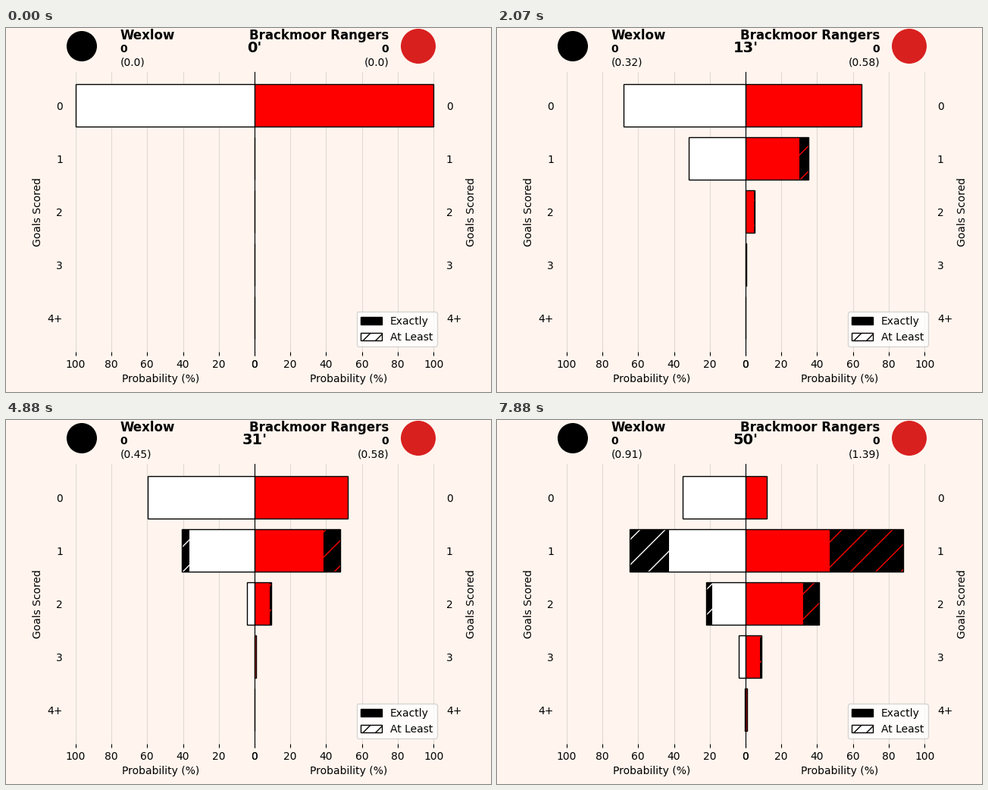
These frames come from a looping animation (640x480 px, 8 s). A matplotlib script:

```python
import numpy as np
import matplotlib.pyplot as plt
from matplotlib.animation import FuncAnimation
from matplotlib.patches import Circle, Patch

STEP = 20                    # ms per drawn frame
LOOP = 8000
HOLD, SUB, SUBS = 160, 30, 5  # quiet minute, and the pieces of a minute with a shot
PAPER = "seashell"
ROWS = np.arange(5)

# minute -> chance of scoring
HOME = {10: .318, 16: .02, 19: .10, 24: .01, 40: .251, 45: .21}
AWAY = {2: .14, 3: .131, 9: .02, 13: .288, 37: .76, 47: .05}

busy = set(HOME) | set(AWAY)
lengths = [SUB * SUBS if m in busy else HOLD for m in range(51)]
starts = np.concatenate([[0], np.cumsum(lengths)[:-1]])


def goal_odds(shots, minute, share):
    """Percent chance of exactly and of at least 0..4 goals."""
    dist = np.array([1.0])
    for m, p in shots.items():
        if m <= minute:
            p *= share if m == minute else 1
            dist = np.convolve(dist, [1 - p, p])
    dist = np.pad(dist, (0, 5))
    tail = dist[::-1].cumsum()[::-1][:5]
    exact = dist[:5].copy()
    exact[4] = tail[4]
    tail[0] = exact[0]
    return 100 * exact, 100 * tail


class Side:
    def __init__(self, ax, name, color, shots, align):
        self.shots = shots
        zero = np.zeros(5)
        self.tail = ax.barh(ROWS, zero, color="black", edgecolor=color,
                            hatch="/", linewidth=0)
        self.exact = ax.barh(ROWS, zero, color=color, linewidth=0)
        self.frame = ax.barh(ROWS, zero, fill=False, edgecolor="black", linewidth=1)
        ax.text(75, -1.25, name, ha=align, weight="bold", size=12)
        ax.text(75, -1, "0", ha=align, weight="bold")
        self.total = ax.text(75, -.75, "", ha=align)

    def update(self, minute, share):
        exact, tail = goal_odds(self.shots, minute, share)
        for bars, widths in ((self.tail, tail), (self.exact, exact), (self.frame, tail)):
            for bar, w in zip(bars, widths):
                bar.set_width(w)
        total = sum(p for m, p in self.shots.items() if m <= minute)
        self.total.set_text(f"({round(float(total), 2)})")


def style(ax, xlim, inner):
    ax.set(xlim=xlim, ylim=(4.64, -.64), xticks=range(0, 101, 20),
           xlabel="Probability (%)", ylabel="Goals Scored", facecolor=PAPER)
    ax.set_yticks(ROWS, ["0", "1", "2", "3", "4+"])
    ax.tick_params(axis="y", length=0)
    ax.set_axisbelow(True)
    ax.grid(axis="x", alpha=.4)
    for side, spine in ax.spines.items():
        spine.set_visible(side == inner)


fig, (left, right) = plt.subplots(1, 2, figsize=(6.4, 4.8), dpi=100, facecolor=PAPER)
fig.subplots_adjust(left=.125, right=.9, bottom=.11, top=.88, wspace=0)

sides = [Side(left, "Wexlow", "white", HOME, "left"),
         Side(right, "Brackmoor Rangers", "red", AWAY, "right")]
right.yaxis.tick_right()
right.yaxis.set_label_position("right")
style(left, (105, 0), "right")
style(right, (0, 105), "left")
clock = right.text(0, -1, "", ha="center", weight="bold", size=14)

right.legend(handles=[Patch(facecolor="black", edgecolor="black", label="Exactly"),
                      Patch(facecolor="white", edgecolor="black", hatch="//",
                            label="At Least")],
             loc="lower right")

for x, r, color in ((1.0, .2, "black"), (5.44, .23, "#d8201f")):
    fig.add_artist(Circle((x, 4.56), r, color=color, lw=0,
                          transform=fig.dpi_scale_trans))


def update(i):
    t = i * STEP + STEP / 2
    minute = int(np.searchsorted(starts, t, side="right")) - 1
    share = min((t - starts[minute]) // SUB + 1, SUBS) / SUBS
    for side in sides:
        side.update(minute, share)
    clock.set_text(f"{minute}'")
    return []


anim = FuncAnimation(fig, update, frames=LOOP // STEP, interval=STEP,
                     repeat=True, repeat_delay=0)
plt.show()
```
